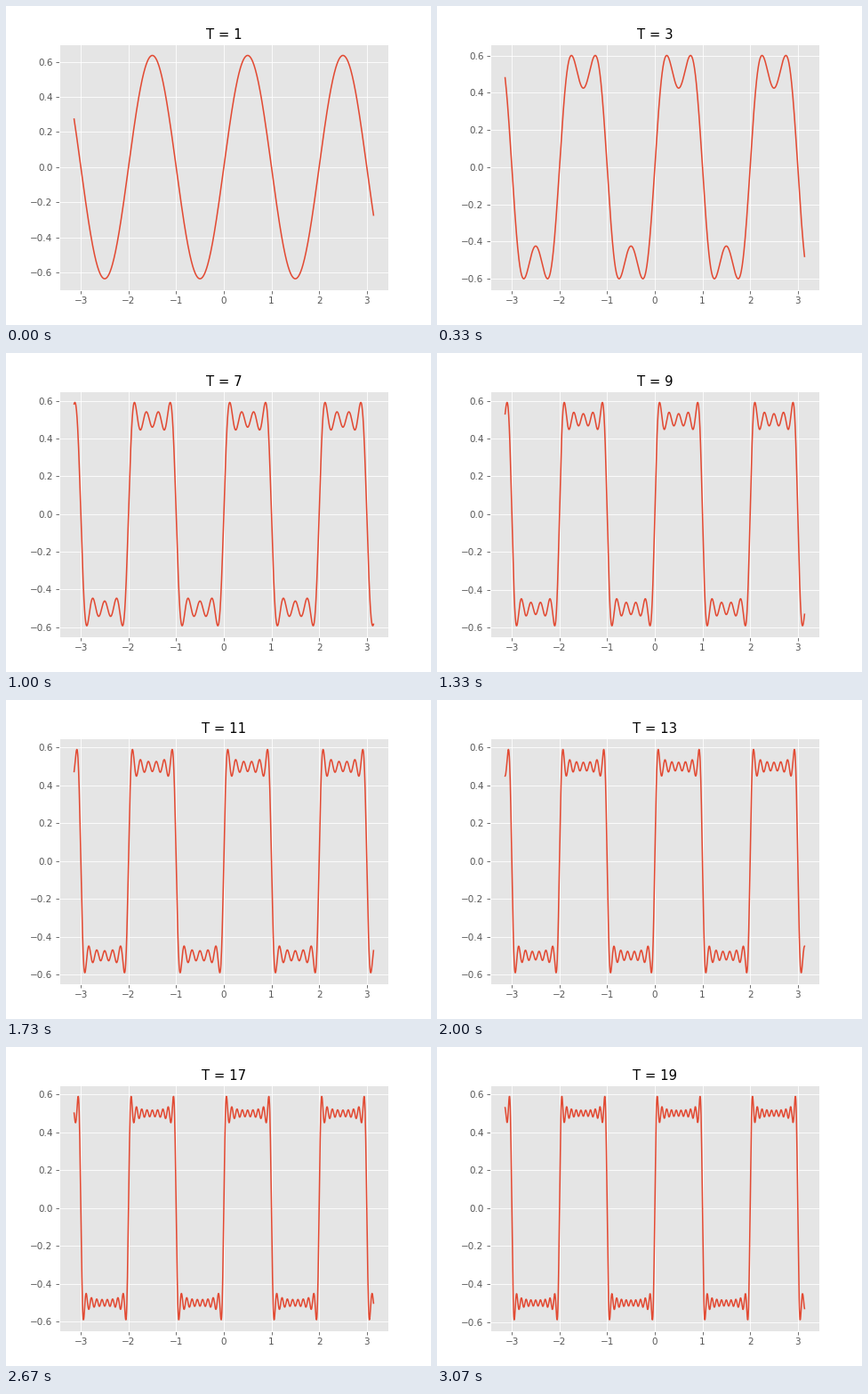
A matplotlib script that plays this animation: 478 by 358 pixels, repeating every 3340 ms.

```python
import matplotlib.pyplot as plt
import numpy as np
from matplotlib.animation import FuncAnimation

WIDTH, HEIGHT = 478, 358
DPI = 74.6875            # a 6.4 inch wide figure
LOOP_MS, STEP_MS = 3340, 20
LAST_TERM = 9

plt.style.use("ggplot")
# The tiny excess keeps rounding from losing a pixel.
fig, ax = plt.subplots(
    figsize=((WIDTH + 1e-3) / DPI, (HEIGHT + 1e-3) / DPI), dpi=DPI)
x = np.linspace(-np.pi, np.pi, 1000)
line, = ax.plot(x, np.zeros_like(x))
title = ax.set_title("")


def square_wave(order):
    """Fourier partial sum of a square wave, odd harmonics up to order."""
    k = np.arange(1, order + 1, 2)[:, None]
    return (2 / (np.pi * k) * np.sin(np.pi * k * x)).sum(axis=0)


def update(frame):
    # Three new harmonics per second.
    term = min(LAST_TERM, (frame * STEP_MS + 14) * 3 // 1000)
    order = 2 * term + 1
    line.set_ydata(square_wave(order))
    title.set_text(f"T = {order}")
    ax.relim()
    ax.autoscale_view()
    return line, title


anim = FuncAnimation(fig, update, frames=LOOP_MS // STEP_MS,
                     init_func=lambda: update(0), interval=STEP_MS,
                     repeat=True, repeat_delay=0)
plt.show()
```
